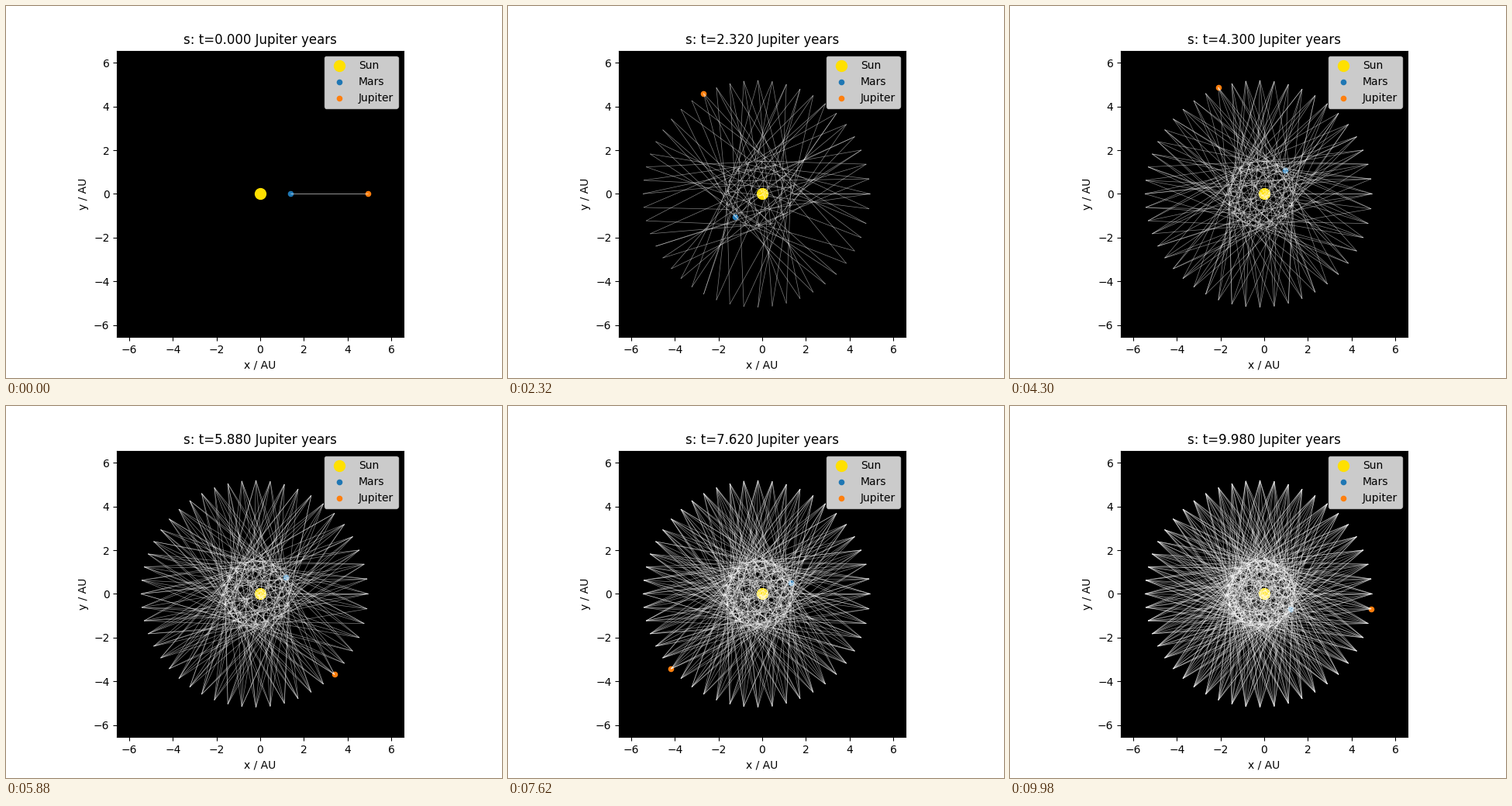
Recreate the animation shown at these times as a matplotlib script. Size 640 by 480 pixels, loop 10000 ms.

```python
import matplotlib.pyplot as plt
import numpy as np
from matplotlib.animation import FuncAnimation
from matplotlib.collections import LineCollection

FRAMES = 500
INTERVAL = 20        # ms
YEARS_PER_FRAME = 0.02

# semi-major axis (AU), eccentricity, period (Earth years)
MARS = (1.523, 0.09, 1.881)
JUPITER = (5.202, 0.05, 11.861)


def orbit(planet, years):
    """Positions on a Kepler orbit that starts at perihelion on the +x axis."""
    a, e, period = planet
    mean = 2 * np.pi * years / period
    ecc = mean + e * np.sin(mean)
    for _ in range(6):
        ecc -= (ecc - e * np.sin(ecc) - mean) / (1 - e * np.cos(ecc))
    x = a * (np.cos(ecc) - e)
    y = a * np.sqrt(1 - e**2) * np.sin(ecc)
    return np.column_stack([x, y])


times = np.arange(FRAMES) * YEARS_PER_FRAME
mars_path = orbit(MARS, times * JUPITER[2])
jupiter_path = orbit(JUPITER, times * JUPITER[2])
links = np.stack([mars_path, jupiter_path], axis=1)
# the opening link is laid down twice
links = np.concatenate([links[:1], links])

fig, ax = plt.subplots(figsize=(6.4, 4.8), dpi=100)
ax.set_facecolor("black")
ax.set_aspect("equal")
limit = 1.2 * JUPITER[0] * (1 + JUPITER[1])
ax.set_xticks(range(-6, 7, 2))
ax.set_yticks(range(-6, 7, 2))
ax.set_xlim(-limit, limit)
ax.set_ylim(-limit, limit)
ax.set_xlabel("x / AU")
ax.set_ylabel("y / AU")
title = ax.set_title("", y=1.0)

ax.scatter(0, 0, s=100, color="#ffe000", label="Sun")
mars = ax.scatter(*mars_path[0], s=20, color="C0", label="Mars")
jupiter = ax.scatter(*jupiter_path[0], s=20, color="C1", label="Jupiter")
web = LineCollection([], colors="white", linewidths=0.5, alpha=0.5, zorder=2)
ax.add_collection(web, autolim=False)
ax.legend(loc="upper right")


def draw(i):
    mars.set_offsets(mars_path[i])
    jupiter.set_offsets(jupiter_path[i])
    web.set_segments(links[:i + 2])
    title.set_text(f"s: t={times[i]:.3f} Jupiter years")
    return mars, jupiter, web, title


anim = FuncAnimation(fig, draw, frames=FRAMES, interval=INTERVAL,
                     init_func=lambda: draw(0), repeat=True, repeat_delay=0)
plt.show()
```
